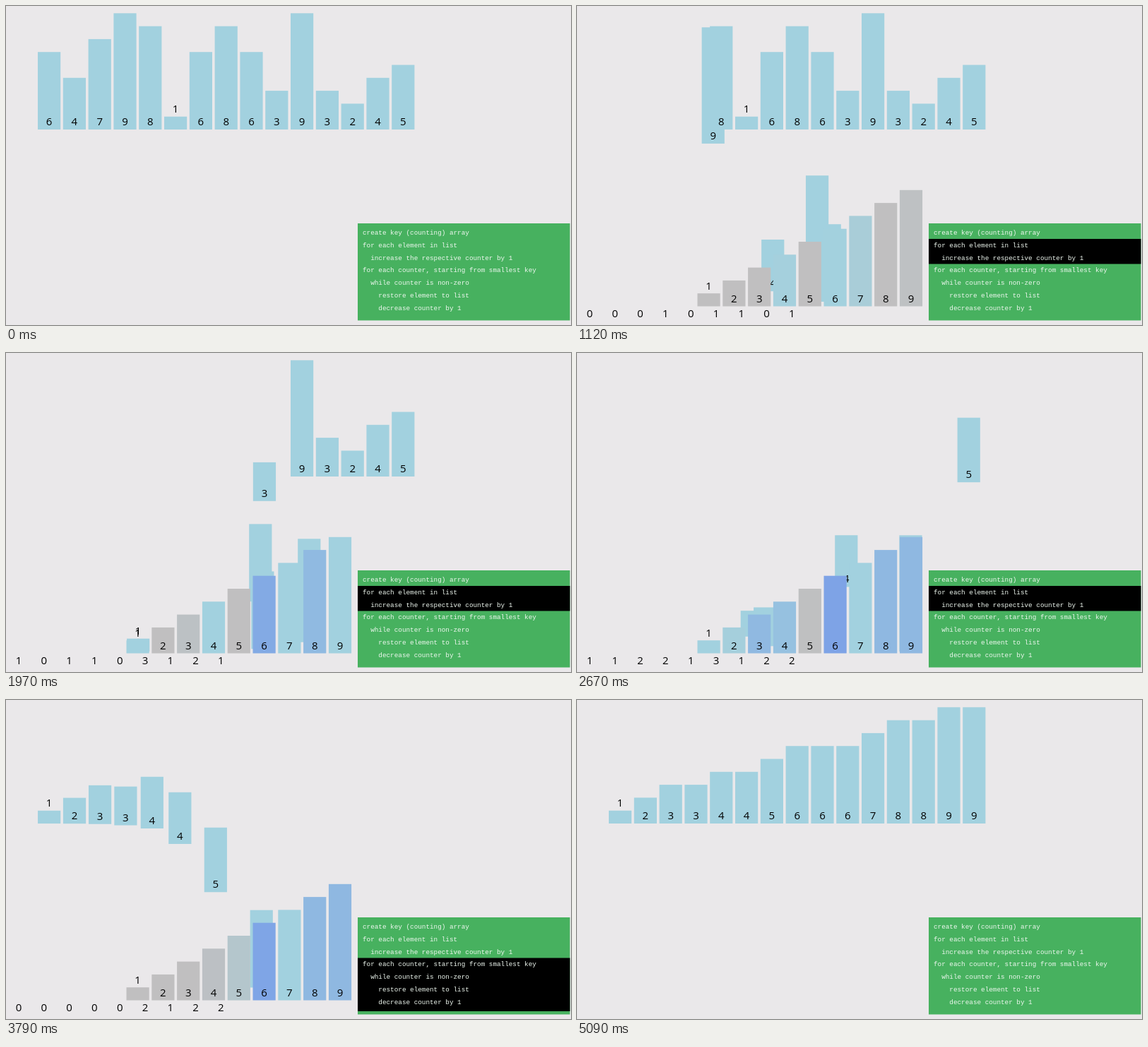
An HTML page with a canvas for the animation above (5.12 s loop, 800 px wide and 452 px high).

```html
<!DOCTYPE html>
<html>
<head>
<meta charset="utf-8">
<title>Counting sort</title>
<style>
html, body { margin: 0; width: 800px; height: 452px; overflow: hidden; background: #eae8ea; }
canvas { display: block; }
</style>
</head>
<body>
<canvas width="800" height="452"></canvas>
<script>
const ctx = document.querySelector('canvas').getContext('2d');
const LOOP = 5120, CREATE = 520, END = 5080, RATE = 0.0083;
const PITCH = 35.8, WIDTH = 32.2, UNIT = 18.3, LIST_Y = 175, KEY_Y = 425.5;
const BACK = [234, 232, 234];
const LEVELS = [[192, 191, 192], [162, 209, 223], [143, 184, 225], [126, 163, 230]];
const CODE = [
  'create key (counting) array',
  'for each element in list',
  '  increase the respective counter by 1',
  'for each counter, starting from smallest key',
  '  while counter is non-zero',
  '    restore element to list',
  '    decrease counter by 1'
];
const values = [6, 4, 7, 9, 8, 1, 6, 8, 6, 3, 9, 3, 2, 4, 5];
const sorted = [...values].sort((a, b) => a - b);
// Launch times towards the keys, and back to the list.
const down = [680, 823, 942, 1110, 1260, 1416, 1525, 1637, 1822, 1952, 2116, 2284, 2386, 2552, 2666];
const up = [2800, 2945, 3090, 3236, 3359, 3530, 3676, 3781, 3990, 4101, 4258, 4374, 4484, 4625, 4765];
const events = [
  ...values.map((key, i) => ({ key, at: down[i], step: 1 })),
  ...sorted.map((key, i) => ({ key, at: up[i], step: -1 }))
];

const slotX = i => 45 + PITCH * i;
const keyX = k => 170.5 + PITCH * (k - 1);
const mix = (a, b, p) => a + (b - a) * p;
const ease = dt => dt > 0 ? 1 - Math.exp(-RATE * dt) : 0;
const rgb = c => `rgb(${c.map(Math.round)})`;

function rect(x, y, w, h, color) {
  ctx.fillStyle = color;
  ctx.fillRect(x, y, w, h);
}

function digit(n, x, y) {
  ctx.font = '15px "Open Sans", "Noto Sans", sans-serif';
  ctx.textAlign = 'center';
  ctx.fillStyle = '#000';
  ctx.fillText(n, x, y + 5);
}

function bar(n, x, base, color = rgb(LEVELS[1])) {
  rect(x, base - n * UNIT, WIDTH, n * UNIT, color);
  digit(n, x + WIDTH / 2, base - (n === 1 ? 29 : 11));
}

function drawKey(k, t) {
  let color = BACK, count = 0;
  const steps = [{ at: CREATE, step: 0 }, ...events.filter(e => e.key === k)].filter(e => e.at <= t);
  steps.forEach((e, i) => {
    count += e.step;
    const until = i + 1 < steps.length ? steps[i + 1].at : t;
    const p = ease(until - e.at);
    color = color.map((v, j) => mix(v, LEVELS[count][j], p));
  });
  bar(k, keyX(k), KEY_Y, rgb(color));
  digit(count, 18 + PITCH * (k - 1), 436);
}

function drawPanel(t) {
  rect(498, 308, 300.5, 137.5, '#47b15f');
  if (t >= CREATE && t < END) {
    const [y, h] = t < down[0] ? [312, 18] : t < up[0] ? [330, 35.5] : [365.5, 75.5];
    rect(498, y, 300.5, h, '#000');
  }
  ctx.font = '9.32px "Liberation Mono", "Courier New", monospace';
  ctx.textAlign = 'left';
  ctx.fillStyle = '#eef7ef';
  CODE.forEach((line, i) => ctx.fillText(line, 505, 323.7 + 17.9 * i));
}

function draw(t) {
  rect(0, 0, 800, 452, rgb(BACK));
  if (t >= END) {
    sorted.forEach((n, i) => bar(n, slotX(i), LIST_Y));
  } else {
    values.forEach((n, i) => {
      const p = ease(t - down[i]);
      if (p < 0.995) bar(n, mix(slotX(i), keyX(n), p), mix(LIST_Y, KEY_Y, p));
    });
    sorted.forEach((n, i) => {
      const p = ease(t - up[i]);
      if (p > 0) bar(n, mix(keyX(n), slotX(i), p), mix(KEY_Y, LIST_Y, p));
    });
    if (t >= CREATE) for (let k = 1; k <= 9; k++) drawKey(k, t);
  }
  drawPanel(t);
}

let start;
function frame(now) {
  start ??= now;
  draw((now - start) % LOOP);
  requestAnimationFrame(frame);
}
requestAnimationFrame(frame);
</script>
</body>
</html>
```
